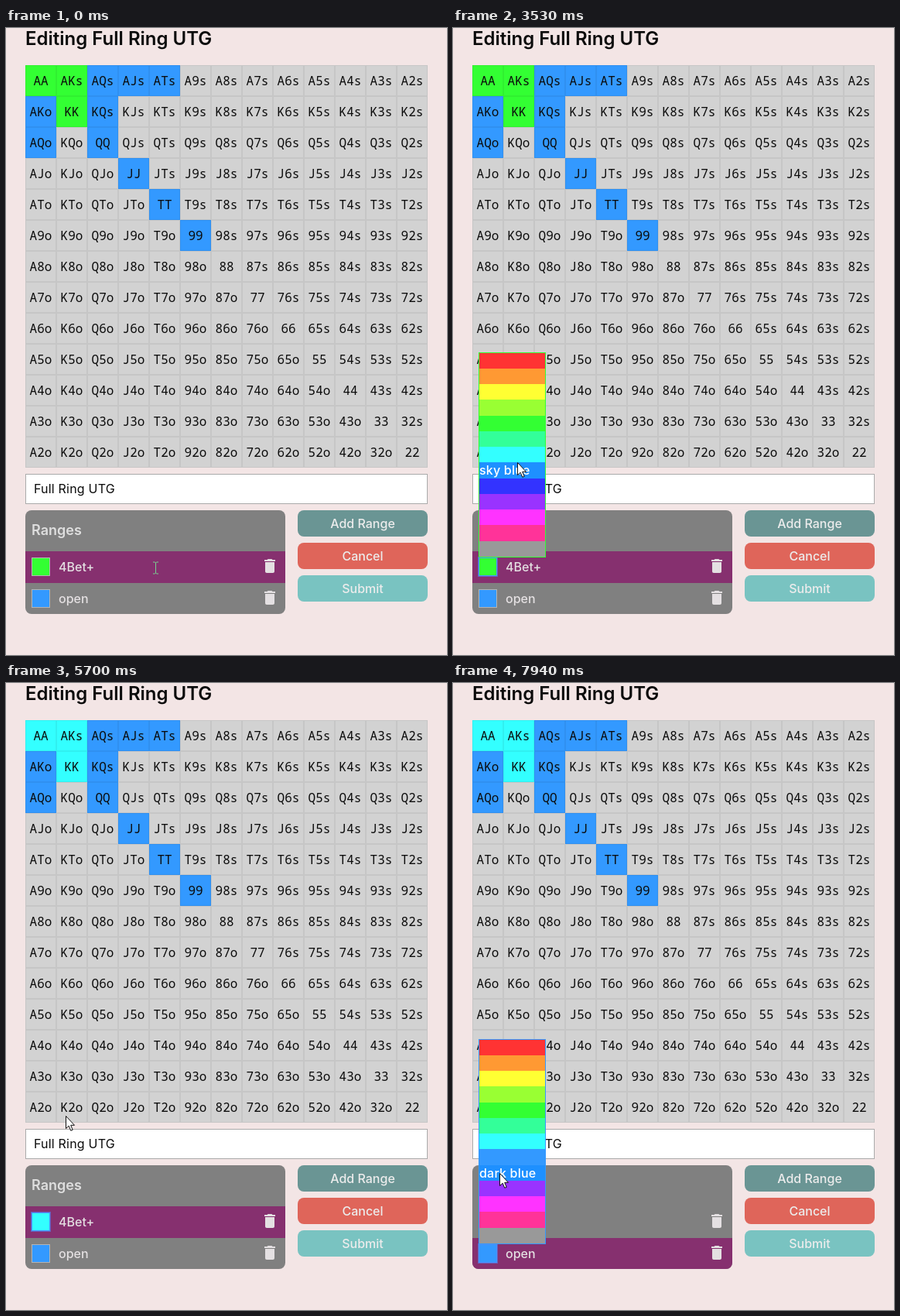
An HTML page for the animation above (8000 ms loop, 570 by 810 pixels).

```html
<!DOCTYPE html>
<html lang="en">
<head>
<meta charset="utf-8">
<title>Range editor</title>
<style>
  * { box-sizing: border-box; }
  html, body { margin: 0; width: 100%; height: 100%; overflow: hidden; }
  body {
    position: relative; background: #f3e5e5; color: #0b0b0b;
    font: 16px Inter, sans-serif;
    --first: #33ff33; --second: #3399ff;
  }
  body > *, .range > * { position: absolute; }
  h1 { left: 25px; top: 0; margin: 0; font-size: 24px; font-weight: 600; line-height: 27px; white-space: nowrap; }
  #grid {
    left: 25px; top: 48px; width: 520px; height: 520px;
    display: grid; grid-template-columns: repeat(13, 40px);
    font-family: "Noto Sans Mono", monospace;
  }
  #grid div {
    height: 40px; line-height: 38px; text-align: center;
    background: #d2d2d2; border: 1px solid rgba(0, 0, 0, .06);
  }
  #grid .first { background: var(--first); }
  #grid .second { background: var(--second); }
  #name {
    left: 25px; top: 576px; width: 520px; height: 39px; padding-left: 10px;
    line-height: 37px; letter-spacing: .2px; background: #fff; border: 1px solid #aaa;
  }
  #ranges {
    left: 25px; top: 623px; width: 336px; height: 134px;
    border-radius: 8px; background: #808080; color: #e4e0e2; overflow: hidden;
  }
  h2 { margin: 0; padding-left: 8px; height: 53px; font-size: 18px; font-weight: 600; line-height: 52px; color: #dedede; }
  .range { position: relative; height: 41px; }
  .range.active { background: #86306f; }
  .range i { left: 8px; top: 8px; width: 24px; height: 24px; border: 1px solid #b4b4b4; }
  .range i.focus { border-color: #4d90fe; outline: 1px solid rgba(77, 144, 254, .5); }
  .range span { left: 43px; line-height: 41px; font-weight: 500; }
  .range svg { left: 304px; top: 7px; fill: #e4e0e2; }
  .button {
    left: 377px; width: 168px; height: 34px; border-radius: 8px;
    line-height: 34px; text-align: center; font-weight: 500; color: #ececec;
  }
  #menu { left: 33px; width: 87px; height: 265px; padding: .6px 1px 0; }
  #menu div { height: 20.25px; line-height: 20px; letter-spacing: .2px; white-space: nowrap; color: transparent; }
  #menu .hover { background: #1e90ff !important; color: #fff; font-weight: 500; }
  #arrow, #beam { left: 0; top: 0; overflow: visible; }
  #click {
    left: -15px; top: -15px; width: 30px; height: 30px;
    border-radius: 50%; background: rgba(240, 220, 0, .5);
  }
</style>
</head>
<body>
<h1>Editing Full Ring UTG</h1>
<div id="grid"></div>
<div id="name">Full Ring UTG</div>
<div id="ranges">
  <h2>Ranges</h2>
  <div class="range"><i style="background:var(--first)"></i><span>4Bet+</span></div>
  <div class="range"><i style="background:var(--second)"></i><span>open</span></div>
</div>
<div class="button" style="top:623px;background:#6a9594">Add Range</div>
<div class="button" style="top:665px;background:#df655a">Cancel</div>
<div class="button" style="top:707px;background:#79c3c1">Submit</div>
<div id="menu"></div>
<svg id="arrow" width="12" height="20">
  <path d="M.5.5V16.5L4.2 13.2 6.8 19.3 9.2 18.3 6.7 12.3H11.5Z" fill="#fff" stroke="#111"/>
</svg>
<svg id="beam" width="8" height="16">
  <path d="M-3.5-7.5H-1L0-6.5 1-7.5H3.5M0-6.5V6.5M-3.5 7.5H-1L0 6.5 1 7.5H3.5" fill="none" stroke="#79cf90"/>
</svg>
<div id="click"></div>

<script>
const LOOP = 8000;
const ROW = 20.25;
const $ = id => document.getElementById(id);
const add = (parent, className, text) => {
  const el = parent.appendChild(document.createElement("div"));
  el.className = className;
  el.textContent = text;
  return el;
};

// Starting-hand grid: suited above the diagonal, offsuit below
const ranks = "AKQJT98765432";
const first = ["AA", "AKs", "KK"];
const second = ["AQs", "AJs", "ATs", "AKo", "KQs", "AQo", "QQ", "JJ", "TT", "99"];
for (let r = 0; r < 13; r++) {
  for (let c = 0; c < 13; c++) {
    const hand = r === c ? ranks[r] + ranks[r]
      : c > r ? ranks[r] + ranks[c] + "s" : ranks[c] + ranks[r] + "o";
    add($("grid"), first.includes(hand) ? "first" : second.includes(hand) ? "second" : "", hand);
  }
}

const palette = {
  "red": "#ff3333", "orange": "#ff9933", "yellow": "#ffff33", "lime": "#99ff33",
  "green": "#33ff33", "sea green": "#33ff99", "light blue": "#33ffff",
  "sky blue": "#3399ff", "dark blue": "#3333ff", "purple": "#9933ff",
  "magenta": "#ff33ff", "pink": "#ff3399", "grey": "#999999"
};
const options = Object.entries(palette).map(([name, color]) => {
  const el = add($("menu"), "", name);
  el.style.background = color;
  return el;
});

const rows = [...document.querySelectorAll(".range")];
const swatches = rows.map(row => row.querySelector("i"));
for (const row of rows) {
  row.insertAdjacentHTML("beforeend", `<svg width="24" height="24"><path
    d="M6 19c0 1.1.9 2 2 2h8c1.1 0 2-.9 2-2V7H6zM19 4h-3.5l-1-1h-5l-1 1H5v2h14z"/></svg>`);
}

// Pointer moves: quadratic curves sampled in discrete steps
const easeOut = p => 1 - (1 - p) ** 2;
const easeInOut = p => p * p * (3 - 2 * p);
const moves = [
  { start: 1220, end: 1830, steps: 9, via: [117, 678], to: [41, 699], ease: easeInOut },
  { start: 3220, end: 3760, steps: 8, via: [95.6, 619], to: [80, 538], ease: easeOut },
  { start: 4140, end: 4140, steps: 1, via: [80, 545], to: [80, 549], ease: easeOut },
  { start: 5700, end: 6470, steps: 11, via: [53, 636], to: [50, 723], ease: p => p ** 1.2 },
  { start: 6550, end: 6780, steps: 4, via: [49, 731], to: [48, 738], ease: easeOut },
  { start: 7640, end: 7940, steps: 5, via: [50, 685], to: [60, 633], ease: easeOut }
];

function pointer(t) {
  let pos = [193, 697];
  for (const { start, end, steps, via, to, ease } of moves) {
    if (t < start) break;
    const gap = (end - start) / (steps - 1) || 1;
    const step = Math.min(steps, Math.floor((t - start) / gap + 0.05) + 1);
    const u = ease(step / steps);
    pos = pos.map((from, i) =>
      (1 - u) ** 2 * from + 2 * u * (1 - u) * via[i] + u * u * to[i]);
  }
  return pos.map(Math.round);
}

const menus = [
  { open: 2520, close: 4920, top: 419, selected: 4, color: "var(--first)" },
  { open: 6930, close: LOOP, top: 460, selected: 7, color: "var(--second)" }
];
const clicks = [[2440, 2520], [4770, 4850], [6860, 6930]];
const within = (t, a, b) => t >= a && t < b;
const show = (el, on) => { el.style.display = on ? "" : "none"; };

function draw() {
  const t = performance.now() % LOOP;
  const [x, y] = pointer(t);
  const beam = x > 57 && t < 1830;

  document.body.style.setProperty("--first", palette[t < 4920 ? "green" : "light blue"]);
  rows[0].classList.toggle("active", t < 6930);
  rows[1].classList.toggle("active", t >= 6930);
  swatches[0].classList.toggle("focus", within(t, 2440, 6860));
  swatches[1].classList.toggle("focus", t >= 6860);

  const menu = menus.find(m => within(t, m.open, m.close));
  show($("menu"), menu);
  if (menu) {
    $("menu").style.top = menu.top + "px";
    $("menu").style.background = menu.color;
    // The hotspot is the middle of the tip pixel
    const row = Math.floor((y + 0.5 - menu.top - 0.6) / ROW);
    const hover = row < options.length ? row : menu.selected;
    options.forEach((el, i) => el.classList.toggle("hover", i === hover));
  }

  show($("beam"), beam);
  show($("arrow"), !beam);
  show($("click"), clicks.some(([a, b]) => within(t, a, b)));
  $("arrow").style.transform = $("click").style.transform = `translate(${x}px, ${y}px)`;
  $("beam").style.transform = `translate(${x + 0.5}px, ${y + 0.5}px)`;
  requestAnimationFrame(draw);
}
draw();
</script>
</body>
</html>
```
